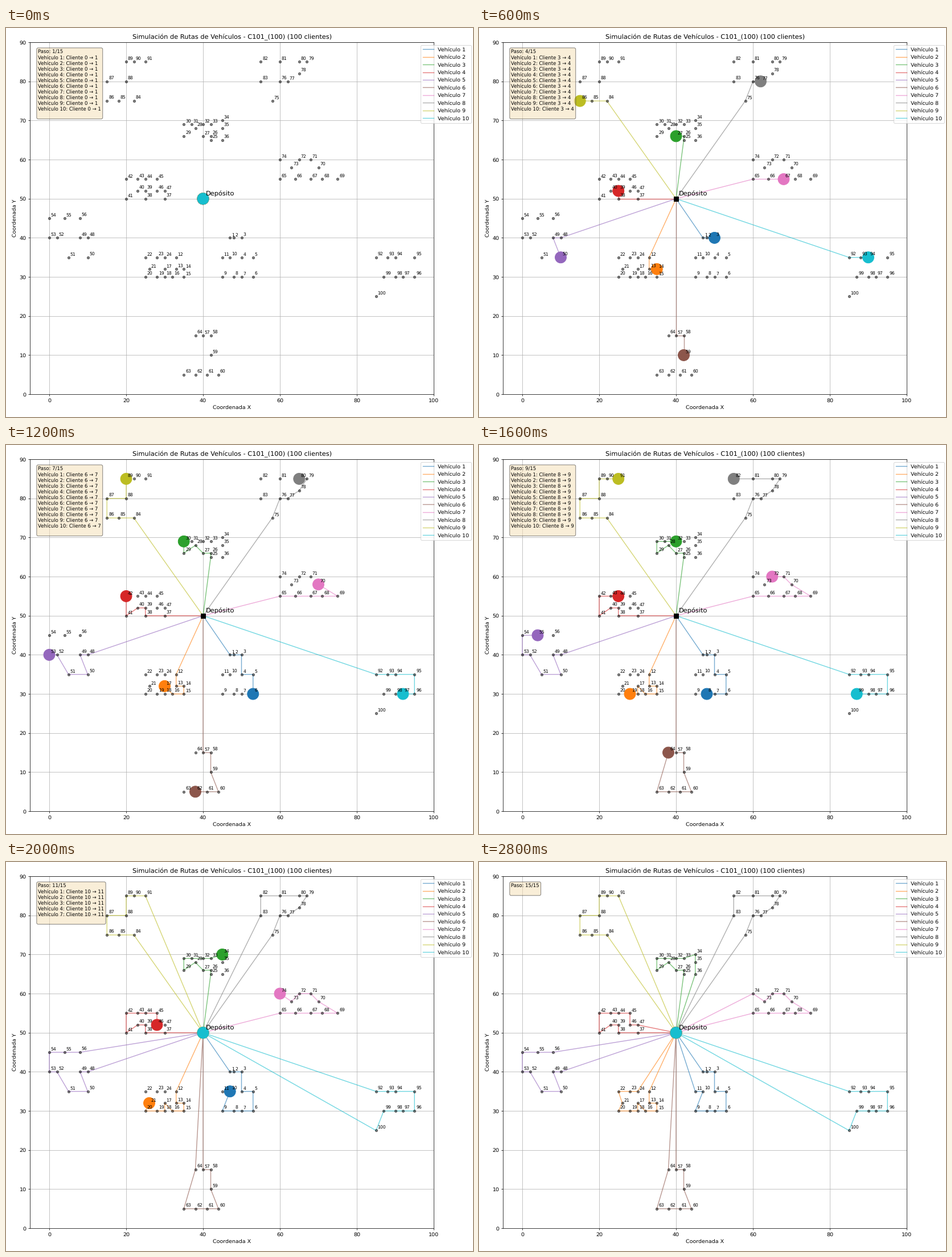
Write a matplotlib script that moves like this. It is 820 by 683 pixels and loops after 3 s.

```python
import matplotlib.pyplot as plt
import numpy as np
from matplotlib.animation import FuncAnimation

W, H = 820, 683
DPI = 205 / 3
DEPOT = (40, 50)
COLORS = plt.get_cmap("tab10").colors

plt.rcParams["font.family"] = "DejaVu Sans"
plt.rcParams["text.hinting"] = "none"


def row(y, start, end=None, n=2):
    """Clients spaced evenly along one level, on whole coordinates."""
    xs = [start] if end is None else np.linspace(start, end, n).round()
    return [(x, y) for x in xs]


def trip(*rows):
    """Round trip from the depot through each row in turn."""
    return [DEPOT] + [p for r in rows for p in row(*r)] + [DEPOT]


routes = [
    trip((40, 47, 50, 3), (35, 50, 53), (30, 53, 45, 4), (35, 47, 45)),
    trip((35, 33), (32, 33, 35), (30, 35, 32), (32, 30), (30, 30, 25, 3),
         (32, 26), (35, 25, 30, 3)),
    trip((65, 42), (66, 42, 40), (68, 38), (66, 35), (69, 35, 42, 4),
         (70, 45), (68, 45), (65, 45)),
    trip((50, 30, 25), (52, 25, 23), (50, 20), (55, 20, 28, 4), (52, 28, 30)),
    trip((40, 10, 8), (35, 10, 5), (40, 2, 0), (45, 0, 8, 3)),
    trip((15, 40, 42), (10, 42), (5, 44, 35, 4), (15, 38)),
    trip((55, 60, 75, 5), (58, 70), (60, 68, 65), (58, 63), (60, 60)),
    trip((75, 58), (80, 60, 62), (82, 65), (85, 67, 65), (85, 60, 55),
         (80, 55)),
    trip((75, 22, 15, 3), (80, 15, 20), (85, 20, 25, 3)),
    trip((35, 85, 90, 3), (35, 95), (30, 95, 87, 4), (25, 85)),
]
steps = max(map(len, routes))
clients = [p for r in routes for p in r[1:-1]]

# The small surplus keeps the pixel size from rounding down.
fig = plt.figure(figsize=((W + 0.01) / DPI, (H + 0.01) / DPI), dpi=DPI,
                 facecolor="white")
left, right, top, bottom = 42.25, 751, 25.1, 643.1
ax = fig.add_axes([left / W, 1 - bottom / H,
                   (right - left) / W, (bottom - top) / H])
ax.set(xlim=(-5, 100), ylim=(0, 90),
       xlabel="Coordenada X", ylabel="Coordenada Y")
ax.set_title("Simulación de Rutas de Vehículos - C101_(100) (100 clientes)")
ax.grid(True)

paths = [ax.plot([], [], color=c, lw=1.5, alpha=0.6,
                 label=f"Vehículo {i}")[0]
         for i, c in enumerate(COLORS, 1)]

ax.scatter(*zip(*clients), s=20, c="black", alpha=0.5, zorder=2.1)
ax.plot(*DEPOT, "ks", ms=8, zorder=2.2)


def tag(text, point, shift, size):
    ax.annotate(text, point, xytext=(shift, shift),
                textcoords="offset points", fontsize=size)


tag("Depósito", DEPOT, 5, 12)
for n, point in enumerate(clients, 1):
    tag(str(n), point, 3, 8)

vehicles = ax.scatter(*zip(*[DEPOT] * len(routes)), s=440, c=COLORS,
                      zorder=2.3)
info = ax.text(0.02, 0.98, "", transform=ax.transAxes, va="top", fontsize=9,
               bbox=dict(boxstyle="round", facecolor="wheat", alpha=0.5))
ax.legend(loc="upper right", bbox_to_anchor=(1.1, 1))


def draw(step):
    text = f"Paso: {step + 1}/{steps}\n"
    spots = []
    for i, (route, path) in enumerate(zip(routes, paths), 1):
        done = route[:step + 1]
        path.set_data(*zip(*done))
        spots.append(done[-1])
        if step < len(route) - 1:
            text += f"Vehículo {i}: Cliente {step} → {step + 1}\n"
    vehicles.set_offsets(spots)
    info.set_text(text)
    return [*paths, vehicles, info]


anim = FuncAnimation(fig, draw, frames=steps, init_func=lambda: draw(0),
                     interval=200, repeat=True, repeat_delay=0, blit=False)
plt.show()
```
